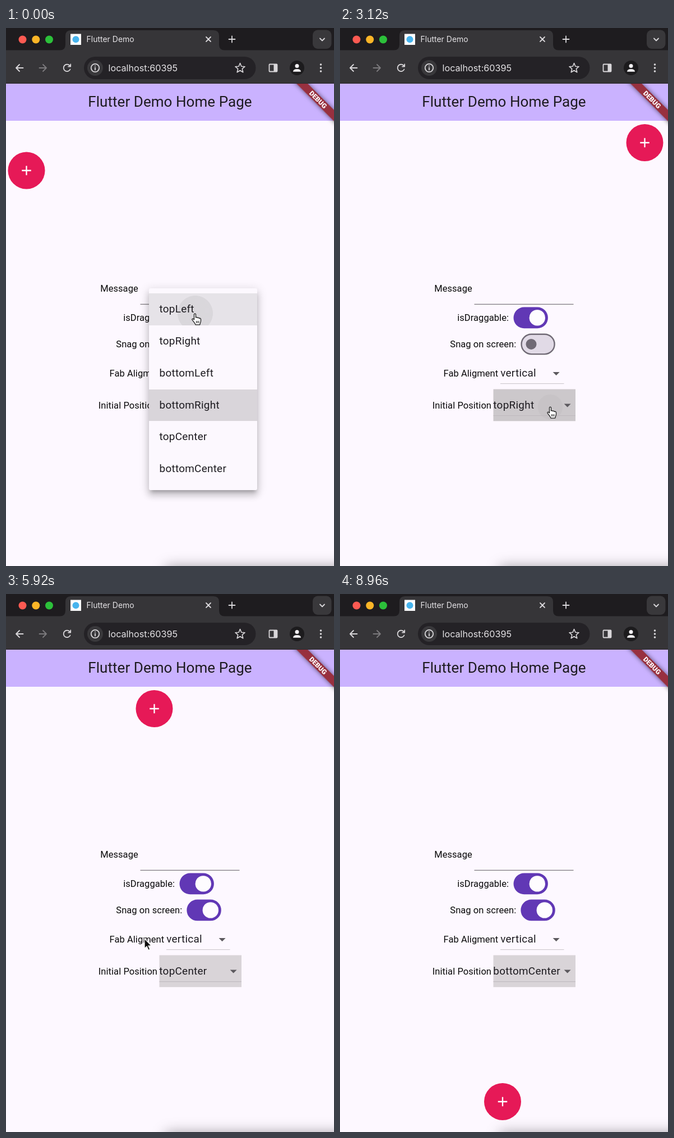
Recreate the animation shown at these times as an HTML page. Size 585 by 957 pixels, loop 9000 ms.

```html
<!DOCTYPE html>
<html lang="en">
<head>
<meta charset="utf-8">
<title>Flutter Demo</title>
<style>
html, body { margin: 0; width: 100%; height: 100%; overflow: hidden; background: #fdf8ff; }
#stage { position: relative; width: 585px; height: 957px; overflow: hidden; font-family: Roboto, sans-serif; }
svg { position: absolute; left: 0; top: 0; }
.ui { font: 14px Inter, sans-serif; fill: #e4e2e5; }
.label { font-size: 16.5px; letter-spacing: .06px; fill: #0a0a0a; }
.value { font-size: 18.9px; letter-spacing: .28px; fill: #1d1b20; }
.line { fill: none; stroke: #d9d7da; stroke-width: 1.8; stroke-linecap: round; stroke-linejoin: round; }
#menu {
  position: absolute; left: 254.5px; width: 193.5px; overflow: hidden; border-radius: 2.4px; background: #fcf8fe;
  box-shadow: 0 6px 6px -3.5px rgba(0,0,0,.2), 0 9.5px 12px 1px rgba(0,0,0,.14), 0 3.5px 16.5px 2.4px rgba(0,0,0,.12);
}
#list { position: absolute; left: 0; width: 100%; }
.item {
  height: 56.7px; line-height: 56.7px; padding-left: 19px; white-space: nowrap;
  font-size: 18.9px; letter-spacing: .28px; color: #1d1b20;
}
#edge {
  position: absolute; left: 288px; top: 961px; width: 420px; height: 60px;
  box-shadow: 0 0 24px 3px rgba(0,0,0,.36);
}
</style>
</head>
<body>
<div id="stage">
<svg width="585" height="957">
  <defs>
    <clipPath id="page"><rect y="99" width="585" height="858"/></clipPath>
    <clipPath id="btnClip"><rect x="273.5" y="642.5" width="146.5" height="56.7"/></clipPath>
  </defs>

  <!-- browser -->
  <rect width="585" height="99" fill="#1e1c1f"/>
  <path d="M0 39.5H96Q106 39.5 106 29.5V14Q106 4 116 4H370Q380 4 380 14V29.5Q380 39.5 390 39.5H585V98.5H0Z" fill="#363538"/>
  <circle cx="29.5" cy="20.5" r="7" fill="#fd5a52"/>
  <circle cx="53.3" cy="20.5" r="7" fill="#fbb527"/>
  <circle cx="77" cy="20.5" r="7" fill="#2cc03a"/>
  <rect x="115" y="10.5" width="19" height="19.5" fill="#fff"/>
  <circle cx="124.5" cy="20.2" r="6" fill="#47b4ee"/>
  <text class="ui" x="143.5" y="25">Flutter Demo</text>
  <path class="line" d="M357 16l8 8m0-8l-8 8M397.5 20h11M403 14.5v11"/>
  <rect x="547" y="3.5" width="33.5" height="33.5" rx="9" fill="#39383b"/>
  <path class="line" d="M560 18.5l4 4l4-4"/>
  <path class="line" d="M30.5 71H18M24 65l-6 6l6 6"/>
  <path class="line" style="stroke:#7c7a7d" d="M59.500 71H72M66 65l6 6l-6 6"/>
  <path class="line" d="M114.500 73.500A6.200 6.200 0 1 1 113.200 66.500L115 68.300M115.200 64.500V68.600H111"/>
  <rect x="139" y="51" width="306.500" height="40" rx="20" fill="#242226"/>
  <circle cx="159" cy="71" r="14" fill="#39383b"/>
  <circle class="line" cx="159" cy="71" r="7.200"/>
  <path class="line" d="M159 70.500v4M159 67.300v.1"/>
  <text class="ui" style="font-size:16.2px" x="182.500" y="77">localhost:60395</text>
  <path id="star" class="line" style="stroke-width:1.6"/>
  <rect class="line" x="469.500" y="64.500" width="14" height="13" rx="1"/>
  <rect x="477.500" y="64.500" width="6.500" height="13" fill="#d9d7da"/>
  <circle cx="519" cy="71" r="13" fill="#1c1b1d"/>
  <circle cx="519" cy="67.500" r="3.500" fill="#f1eff2"/>
  <path d="M512 77.800Q512 73 519 73T526 77.800Z" fill="#f1eff2"/>
  <g fill="#d9d7da"><circle cx="561.500" cy="65" r="1.800"/><circle cx="561.500" cy="71" r="1.800"/><circle cx="561.500" cy="77" r="1.800"/></g>

  <!-- page -->
  <rect y="99" width="585" height="66" fill="#cab2ff"/>
  <text x="292.500" y="140" font-size="26" letter-spacing=".05" text-anchor="middle" fill="#1d1b20">Flutter Demo Home Page</text>
  <g clip-path="url(#page)">
    <g transform="translate(585 99) rotate(45)">
      <rect x="-60" y="33.070" width="120" height="14.200" fill="#98303f" style="filter:drop-shadow(0 0 4px rgba(0,0,0,.55))"/>
      <text y="44.400" font-size="12" font-weight="900" text-anchor="middle" fill="#fff">DEBUG</text>
    </g>
  </g>
  <g class="label">
    <text x="168.200" y="469">Message</text>
    <text x="209.200" y="521">isDraggable:</text>
    <text x="196.300" y="568.300">Snag on screen:</text>
    <text x="184.500" y="620.300">Fab Aligment</text>
    <text x="164.800" y="677">Initial Position</text>
  </g>
  <rect x="239.500" y="490.800" width="177" height="1.300" fill="#817c82"/>
  <rect x="309.500" y="496.500" width="61.400" height="37.800" rx="18.900" fill="#6138b5"/>
  <circle cx="351.800" cy="515.400" r="14.200" fill="#fefcff"/>
  <rect id="track" x="323.600" y="544.700" width="59" height="35.400" rx="17.700" stroke-width="2.400"/>
  <circle id="thumb" cy="562.400"/>
  <text class="value" x="286.200" y="620">vertical</text>
  <rect x="286" y="632" width="113.500" height="1.100" fill="#cdc8ce"/>
  <path d="M379.600 612h12l-6 6z" fill="#5c595e"/>
  <g clip-path="url(#btnClip)">
    <rect x="273" y="642" width="148" height="58" fill="#d9d4d8"/>
    <rect id="press" x="273" y="642" width="148" height="58"/>
    <circle id="ink" fill-opacity=".025"/>
    <rect x="273" y="689" width="148" height="1.100" fill="#bfbabf"/>
  </g>
  <path d="M399.600 668.500h12l-6 6z" fill="#5c595e"/>
  <text id="value" class="value" x="273.300" y="677"></text>
  <g id="fab">
    <circle r="33" fill="#e61957"/>
    <path d="M-8.250 0h16.500M0-8.250v16.500" stroke="#fff" stroke-width="2.300"/>
  </g>
</svg>
<div id="menu"><div id="list"></div></div>
<div id="edge"></div>
<svg width="585" height="957" style="pointer-events:none">
  <g id="hand" stroke="#1c1c1c" stroke-width="1.300" stroke-linejoin="round">
    <path fill="#fff" d="M-1.500 1.500C-1.500-.3 1.500-.3 1.500 1.500V7C2 6.200 4.300 6.400 4.500 7.600C5.300 6.900 7.100 7.200 7.500 8.500C8.500 7.900 10.500 8.400 10.500 10.300V13C10.500 15.500 9 16.500 8.800 19.800H1C.5 17.500-2.500 14.500-4.700 11.300C-5.800 9.600-3.900 8.300-2.500 9.700L-1.500 10.800Z"/>
    <path fill="none" d="M2.500 13v4M4.700 13v4M6.900 13v4" stroke-width="1"/>
  </g>
  <path id="arrow" fill="#0c0c0c" stroke="#fff" stroke-width="1.300" d="M0 0V17.500L4.100 13.900L6.900 20.500L9.800 19.200L7 12.800H12.400Z"/>
</svg>
</div>
<script>
const $ = id => document.getElementById(id);
const LOOP = 9000, ITEM = 56.7, PAD = 9.45;
const names = ['topLeft', 'topRight', 'bottomLeft', 'bottomRight', 'topCenter', 'bottomCenter'];
const HEIGHT = names.length * ITEM + 2 * PAD;

// press: button tap, pick: item tap, sel: item focused on opening
const menus = [
  { press: -900, open: -750, pick: -120, close: 200, top: 463, sel: 3, x: 337, y: 508, next: 0 },
  { press: 1030, open: 1180, pick: 2140, close: 2440, top: 553.5, sel: 0, x: 342, y: 641, next: 1 },
  { press: 3034, open: 3190, pick: 3990, close: 4250, top: 553.5, sel: 1, x: 322, y: 815, next: 4 },
  { press: 6350, open: 6500, pick: 7130, close: 7400, top: 406.5, sel: 4, x: 336, y: 720, next: 5 }
];

const pointer = [
  [0, 337, 508], [250, 337, 508], [800, 346, 664], [1250, 346, 664], [1900, 342, 641],
  [2450, 342, 641], [2850, 375, 674], [3300, 375, 674], [3850, 322, 815], [4250, 322, 815],
  [4600, 305, 687], [4880, 352, 562], [5350, 352, 562], [5920, 247, 613], [6300, 340, 668],
  [6600, 340, 668], [7000, 336, 720], [7750, 336, 720], [8400, 328, 980]
];
const fabPath = [
  [0, 36.5, 253.5], [200, 36.5, 253.5], [750, 36.5, 204], [2440, 36.5, 204], [2990, 543.5, 204],
  [4253, 543.5, 204], [4803, 290, 204], [4930, 290, 204], [5480, 36.5, 204], [5484, 36.5, 204],
  [6034, 290, 204], [7399, 290, 204], [7949, 290, 903]
];
const SNAG = 4930;

const clamp = v => Math.max(0, Math.min(1, v));
const mix = (a, b, p) => a + (b - a) * p;
const ease = p => (1 - Math.cos(Math.PI * p)) / 2;
const inside = (x, y, l, t, w, h) => x >= l && x <= l + w && y >= t && y <= t + h;
const place = (el, x, y) => el.setAttribute('transform', `translate(${x} ${y})`);
const set = (el, attrs) => { for (const k in attrs) el.setAttribute(k, attrs[k]); };

function along(path, t) {
  const i = path.findIndex(k => k[0] > t);
  if (i < 0) return path[path.length - 1].slice(1);
  const a = path[i - 1], b = path[i], p = ease((t - a[0]) / (b[0] - a[0]));
  return [mix(a[1], b[1], p), mix(a[2], b[2], p)];
}

const items = names.map(name => {
  const el = document.createElement('div');
  el.className = 'item';
  el.textContent = name;
  $('list').append(el);
  return el;
});

$('star').setAttribute('d', 'M' + Array.from({ length: 10 }, (_, i) => {
  const a = i * Math.PI / 5, r = i % 2 ? 4 : 9;
  return `${417.5 + r * Math.sin(a)} ${71.5 - r * Math.cos(a)}`;
}).join('L') + 'Z');

function drawMenu(t, px, py) {
  const m = menus.find(m => t >= m.open && t < m.close + 75);
  $('menu').style.display = m ? 'block' : 'none';
  if (!m) return false;
  const p = clamp((t - m.open) / 300), grow = clamp((p - .25) * 4);
  const start = PAD + m.sel * ITEM;
  const top = mix(start, 0, grow), bottom = mix(start + ITEM, HEIGHT, grow);
  set($('menu'), { style: `top:${m.top + top}px;height:${bottom - top}px;opacity:${Math.min(clamp(p * 4), clamp(1 - (t - m.close) / 75))}` });
  $('list').style.top = PAD - top + 'px';

  const since = t - m.pick, unit = .5 / 7.5;
  items.forEach((el, i) => {
    const y = m.top + PAD + i * ITEM;
    const hover = inside(px, py, 254.5, y, 193.5, ITEM);
    const picked = i === m.next && since > 0;
    const shade = (i === m.sel ? .14 : 0) + (picked ? .085 : hover ? .07 : 0);
    el.style.backgroundColor = `rgba(0,0,0,${shade})`;
    const r = Math.min(since * .257, 140);
    el.style.backgroundImage = picked
      ? `radial-gradient(circle at ${m.x - 254.5}px ${m.y - y}px, rgba(0,0,0,.055) ${r}px, transparent ${r + .7}px)`
      : 'none';
    el.style.opacity = i === m.sel ? 1 : clamp((p - .5 - (i + 1) * unit) / (1.5 * unit));
  });
  return t < m.close && inside(px, py, 254.5, m.top, 193.5, HEIGHT);
}

function drawButton(t) {
  const done = menus.filter(m => t >= m.close).pop();
  $('value').textContent = names[done ? done.next : 3];
  const m = menus.find(m => t >= m.press && t < m.open + 200);
  $('press').setAttribute('fill-opacity', m ? .06 : 0);
  const [x, y] = m ? along(pointer, Math.max(0, m.press)) : [0, 0];
  set($('ink'), { cx: x, cy: y, r: m ? (t - m.press) * .257 : 0 });
}

function drawSwitch(t) {
  const p = ease(clamp((t - SNAG) / 300));
  const tone = (a, b) => `rgb(${a.map((v, i) => Math.round(mix(v, b[i], p)))})`;
  const purple = [97, 56, 181], grey = [112, 106, 117];
  set($('track'), { fill: tone([225, 218, 230], purple), stroke: tone(grey, purple) });
  set($('thumb'), { cx: mix(341, 364.8, p), r: mix(9.5, 14.2, p), fill: tone(grey, [254, 252, 255]) });
}

function frame(now) {
  const t = now % LOOP;
  const [x, y] = along(pointer, t);
  place($('fab'), ...along(fabPath, t));
  drawButton(t);
  drawSwitch(t);
  const onMenu = drawMenu(t, x, y);
  const hand = onMenu || inside(x, y, 273.5, 642.5, 146.5, 56.7) || inside(x, y, 322, 543, 62, 38)
    || inside(x, y, 309, 496, 62, 38) || inside(x, y, 286, 586, 114, 56);
  $('hand').style.display = hand ? 'inline' : 'none';
  $('arrow').style.display = hand ? 'none' : 'inline';
  place($(hand ? 'hand' : 'arrow'), x, y);
}

const born = performance.now();
function tick() {
  frame(performance.now() - born);
  requestAnimationFrame(tick);
}
tick();
</script>
</body>
</html>
```
